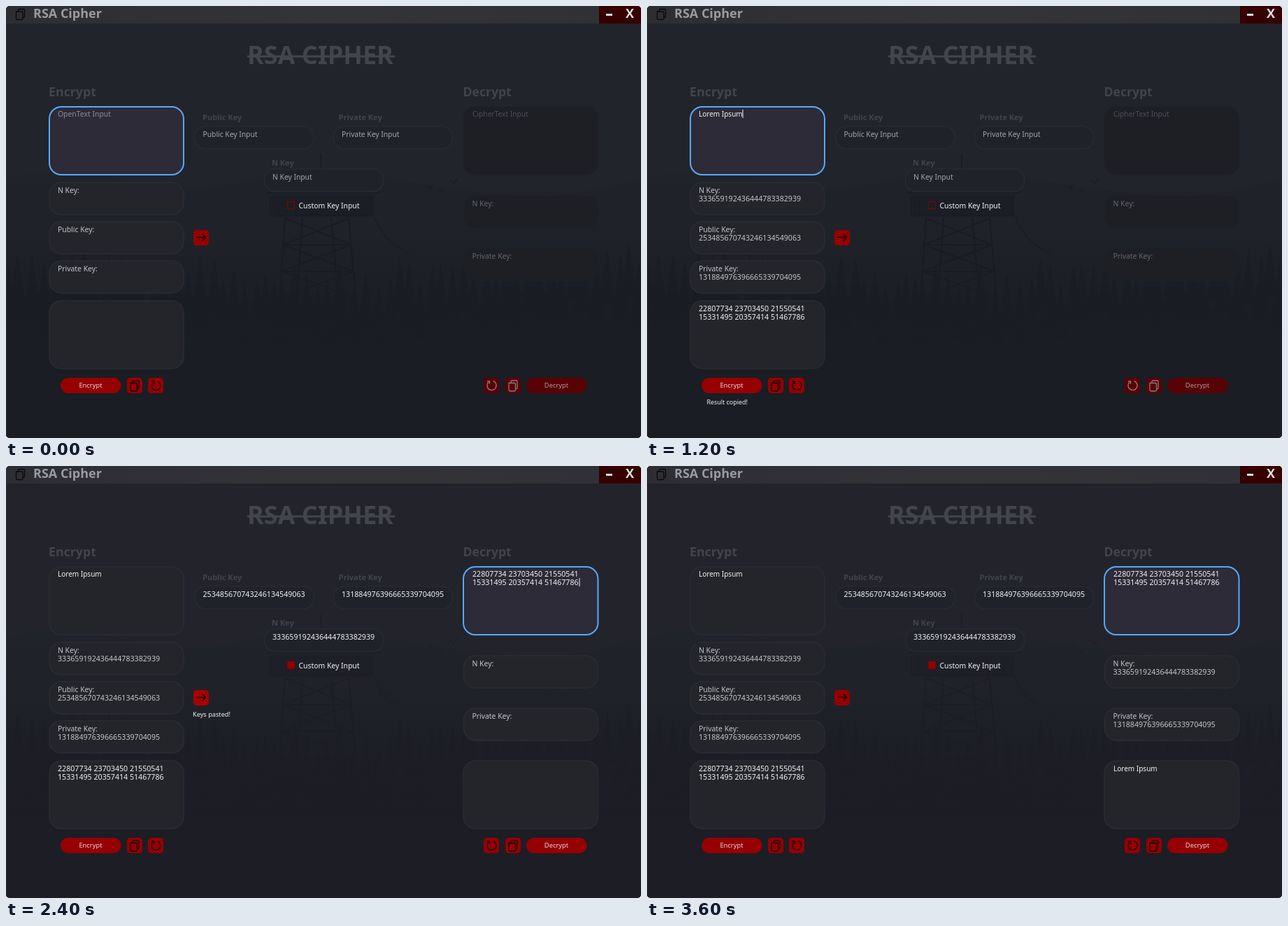
An HTML page for the animation above (4.8 s loop, 908 by 617 pixels).

```html
<!DOCTYPE html>
<html lang="en">
<head>
<meta charset="utf-8">
<title>RSA Cipher</title>
<style>
  html, body { margin: 0; width: 100%; height: 100%; overflow: hidden; background: #fff; }
  svg { display: block; width: 908px; height: 617px; border-radius: 5px; }
  text { font-family: "Noto Sans", "Open Sans", sans-serif; white-space: pre; }
  .bold { font-weight: 700; }
</style>
</head>
<body>
<svg id="stage" viewBox="0 0 908 617"></svg>
<script>
const STEP = 1200;
const stage = document.getElementById('stage');
const nKey = '333659192436444783382939';
const publicKey = '253485670743246134549063';
const privateKey = '131884976396665339704095';
const cipher = ['22807734 23703450 21550541', '15331495 20357414 51467786'];
const RED = '#960000', WHITE = '#f2f2f3', SOFT = '#c4c5c8';

const rect = (x, y, w, h, r, fill, extra = '') =>
  `<rect x="${x}" y="${y}" width="${w}" height="${h}" rx="${r}" fill="${fill}" ${extra}/>`;
const path = (d, stroke, width = 1, fill = 'none') =>
  `<path d="${d}" stroke="${stroke}" stroke-width="${width}" fill="${fill}"/>`;
const text = (x, y, s, fill, size = 10.4, extra = '') =>
  `<text x="${x}" y="${y}" fill="${fill}" font-size="${size}" ${extra}>${s}</text>`;
const bold = (x, y, s, fill, size) => text(x, y, s, fill, size, 'class="bold"');
const digits = (x, y, s, fill) => text(x, y, s, fill, 10.65);
const lines = (x, y, rows, fill) => rows.map((s, i) => digits(x, y + i * 12, s, fill)).join('');

function box(x, y, w, h, look, r = 17) {
  const [fill, line, width] = {
    normal: ['#24252b', '#2b2c32', 1.5],
    inner: ['#202229', '#282a31', 1.5],
    focus: ['#2c2b37', '#55aaff', 2],
    dim: ['#1d1f25', '#1e2026', 1],
  }[look];
  return rect(x + 1, y + 1, w - 2, h - 2, r, fill, `stroke="${line}" stroke-width="${width}"`);
}

function keyBox(x, y, label, value, look, color) {
  return box(x, y, 194, 48, look) +
    text(x + 13, y + 16, label, color) + (value ? digits(x + 13, y + 28, value, SOFT) : '');
}

function copyIcon(x, y, color) {
  return path(`M${x - 6} ${y - 3.5}h8q1.5 0 1.5 1.5v8.500q0 1.500-1.500 1.500h-6.500q-1.500 0-1.500-1.500z
    M${x - 3} ${y - 4}v-1.500q0-1.500 1.500-1.500h6q1.500 0 1.500 1.500v9q0 1.500-1.500 1.500h-1`, color, 1.3);
}

function refreshIcon(x, y, color) {
  return path(`M${x + 2} ${y - 6.3}A6.600 6.600 0 1 1 ${x - 4.6} ${y - 4.7}
    M${x - 6.5} ${y - 6}h3.500v3.700`, color, 1.4);
}

const square = (x, y, fill = RED) => rect(x, y, 22, 22, 4.5, fill);

function pill(x, label, fill, color) {
  return rect(x, 531, 86.500, 22, 11, fill) +
    text(x + 43, 545, label, color, 9.35, 'text-anchor="middle"');
}

function random(seed) {
  return () => (seed = seed * 16807 % 2147483647) / 2147483647;
}

function pine(x, top, h) {
  let left = '', right = '';
  for (let i = 1; i <= 6; i++) {
    const y = top + h * i / 6, w = h * i / 32;
    left = `L${x - w * .55} ${y - 3}L${x - w} ${y}` + left;
    right += `L${x + w} ${y}L${x + w * .55} ${y - 3}`;
  }
  return `M${x} ${top}${right}${left}Z`;
}

function scenery() {
  const rnd = random(73);
  let trees = '', tower = 'M450 211V236M375 267L408 247H497L535 267ZM378 273H526M378 299H526';
  for (let x = 4; x < 908; x += 11 + rnd() * 10) {
    const edge = Math.abs(x - 450) / 450;
    const top = 405 - 35 * edge - rnd() * 38;
    trees += pine(x, top, 75 + rnd() * 35);
  }
  for (let x = 378; x <= 526; x += 12) tower += `M${x} 273V299`;
  // Lattice legs widen downward, one panel at a time.
  const left = y => 399 - (y - 303) * .07, right = y => 490 + (y - 303) * .09;
  for (let y = 303; y < 490; y += 38) {
    const b = y + 38;
    tower += `M${left(y)} ${y}L${left(b)} ${b}L${right(y)} ${y}L${right(b)} ${b}L${left(y)} ${y}
      M${left(b)} ${b}H${right(b)}M${left(y) + 25} ${y}L${left(b) + 25} ${b}M${right(y) - 25} ${y}L${right(b) - 25} ${b}`;
  }
  const birds = [[640, 252, 6], [622, 265, 4], [607, 258, 3]]
    .map(([x, y, s]) => `M${x - s} ${y - s / 2}Q${x - 2} ${y - 2} ${x} ${y + 2}Q${x + 2} ${y - 2} ${x + s} ${y - s}`).join('');
  return `<g opacity=".5">
    ${path('M0 245Q90 228 180 250T350 248T510 240T700 268T908 245V420H0Z', 'none', 0, '#1f2229')}
    ${path(trees, 'none', 0, '#181b21')}
    ${rect(380, 270, 146, 31, 0, '#191b22')}
    ${path(tower, '#16181f', 2.2)}
    ${path('M526 300Q540 338 578 354', '#16181f', 1.2)}
    ${path(birds, '#15171d', 1.3)}
  </g>` + rect(0, 330, 908, 287, 0, 'url(#mist)');
}

const stop = (at, color, opacity = 1) =>
  `<stop offset="${at}" stop-color="${color}" stop-opacity="${opacity}"/>`;
const landscape = scenery();

function background(late) {
  const [top, low] = late ? ['#23242b', '#1c1d25'] : ['#22242b', '#1a1d23'];
  return `<defs>
    <linearGradient id="sky" x2="0" y2="1">${stop(0, top)}${stop(.4, top)}${stop(.8, low)}${stop(1, low)}</linearGradient>
    <linearGradient id="mist" x2="0" y2="1">${stop(0, low, 0)}${stop(.6, low)}${stop(1, low)}</linearGradient>
    <linearGradient id="bar">${stop(0, '#2d2e34')}${stop(.5, '#333338')}${stop(1, '#303136')}</linearGradient>
  </defs>` + rect(0, 0, 908, 617, 0, 'url(#sky)') +
    `<g opacity="${late ? .65 : 1}">${landscape}</g>`;
}

function titleBar() {
  return rect(0, 0, 908, 25, 0, 'url(#bar)') + rect(848, 0, 60, 25, 0, '#350000') +
    copyIcon(20.5, 11.5, '#08080a') + bold(39, 17, 'RSA Cipher', '#9a9ba1', 18) +
    rect(858, 11, 9, 3, 0, '#e2dede') + bold(886, 17, 'X', '#e2dede', 18);
}

function headings() {
  return bold(345, 83, 'RSA CIPHER', '#42444e', 36) + rect(345, 70.5, 211, 3, 0, '#42444e') +
    bold(61, 129, 'Encrypt', '#42444d', 17.8) + bold(653.5, 129, 'Decrypt', '#42444d', 17.6) +
    bold(281, 163, 'Public Key', '#42444c', 11) + bold(475.5, 163, 'Private Key', '#42444c', 11) +
    bold(380, 228, 'N Key', '#42444c', 11);
}

function encryptPane(step) {
  const done = step > 0, value = s => done && s;
  return box(61, 143, 194, 99, step < 2 ? 'focus' : 'normal') +
    (done ? text(74, 158, 'Lorem Ipsum', WHITE, 10) : text(74, 158, 'OpenText Input', '#8d8d97')) +
    (step === 1 ? rect(136.5, 148, 1, 12, 0, WHITE) : '') +
    keyBox(61, 251, 'N Key:', value(nKey), 'normal', SOFT) +
    keyBox(61, 307, 'Public Key:', value(publicKey), 'normal', SOFT) +
    keyBox(61, 363, 'Private Key:', value(privateKey), 'normal', SOFT) +
    box(61, 420, 194, 99, 'normal') + (done ? lines(74, 435.5, cipher, WHITE) : '') +
    pill(78, 'Encrypt', RED, '#e5dada') +
    square(173, 531) + copyIcon(184, 542, '#180000') +
    square(203, 531) + refreshIcon(214.5, 542, '#180000') +
    (step === 1 ? text(85.5, 568.5, 'Result copied!', WHITE, 8.9) : '');
}

function keyPane(step) {
  const custom = step > 1;
  const field = (x, y, hint, value) => box(x, y, 172, 34, 'inner', 15) +
    (custom ? digits(x + 12.5, y + 16, value, WHITE) : text(x + 12.5, y + 16, hint, '#a4a5aa', 10.3));
  const pasted = step === 2;
  return field(269, 171, 'Public Key Input', publicKey) +
    field(467.5, 171, 'Private Key Input', privateKey) +
    field(368.500, 232, 'N Key Input', nKey) +
    rect(402.5, 279.5, 10, 10, 0, custom ? RED : 'none', 'stroke="#850000"') +
    text(418.5, 289, 'Custom Key Input', WHITE) +
    square(268, 320, pasted ? '#a80000' : RED) +
    path('M272 330.5H285.500M280.500 325.500L285.500 330.500L280.500 335.500', '#180000', 1.4) +
    (pasted ? text(267, 358, 'Keys pasted!', WHITE, 9.2) : '');
}

function decryptPane(step) {
  const on = step > 1, done = step > 2;
  const look = on ? 'normal' : 'dim', label = on ? SOFT : '#64666c';
  const red = on ? RED : '#590205', icon = on ? '#180000' : '#8d7b7f';
  return box(653, 143, 194.5, 99, on ? 'focus' : 'dim') +
    (on ? lines(667, 158, cipher, WHITE) : text(667, 158, 'CipherText Input', '#4c4e55', 10.2)) +
    (step === 2 ? rect(819.5, 160, 1, 12, 0, WHITE) : '') +
    keyBox(653.5, 270, 'N Key:', done && nKey, look, label) +
    keyBox(653.5, 345, 'Private Key:', done && privateKey, look, label) +
    (on ? box(653, 420, 194.5, 99, 'normal') : '') +
    (done ? text(667, 435.5, 'Lorem Ipsum', WHITE, 10) : '') +
    square(683, 531, red) + refreshIcon(694.5, 542, icon) +
    square(714, 531, red) + copyIcon(725, 542, icon) +
    pill(744, 'Decrypt', red, on ? '#e5dada' : '#a99b9e');
}

let shown = -1;
function frame() {
  const step = Math.floor(performance.now() / STEP) % 4;
  if (step !== shown) {
    shown = step;
    stage.innerHTML = background(step > 1) + titleBar() + headings() +
      encryptPane(step) + keyPane(step) + decryptPane(step) +
      path('M.5 25V617', '#2a2b31');
  }
  requestAnimationFrame(frame);
}
frame();
</script>
</body>
</html>
```
